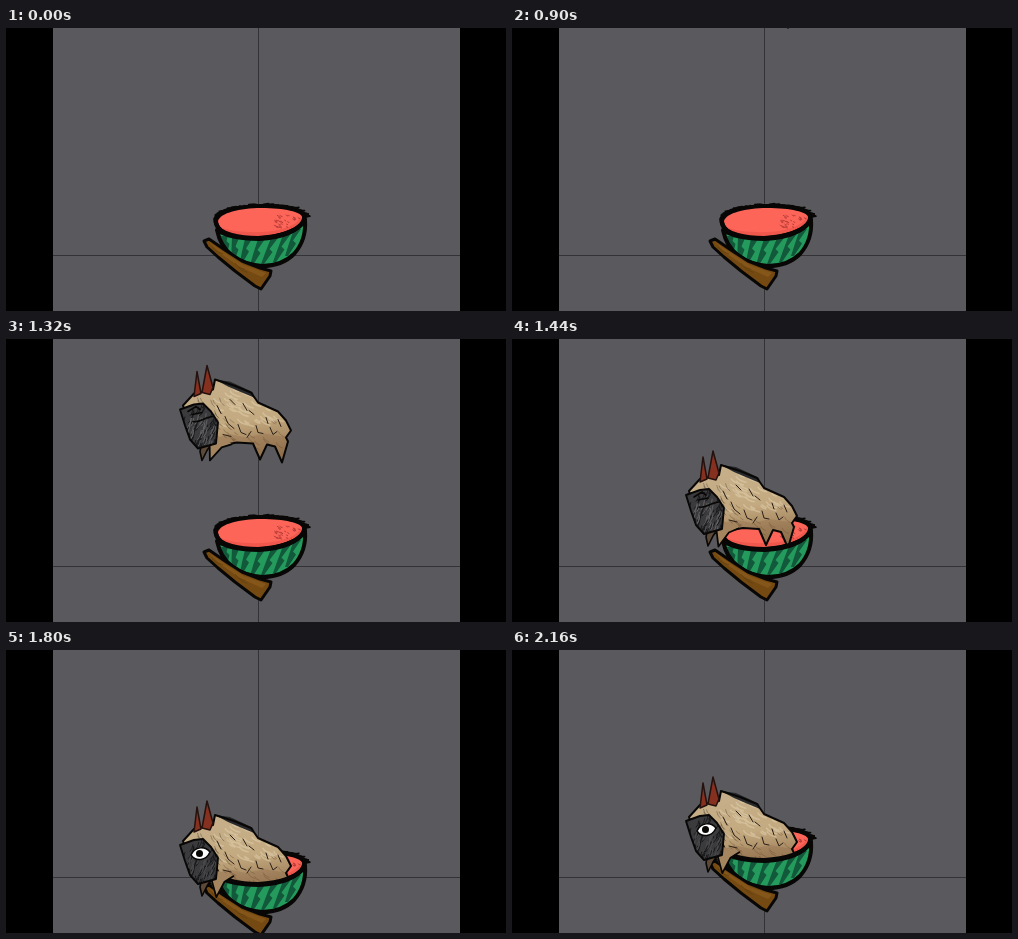
These frames come from a looping animation (500x283 px, 2220 ms). An HTML page with a canvas:

```html
<!DOCTYPE html>
<html lang="en">
<head>
<meta charset="utf-8">
<title>Watermelon bowl</title>
<style>
html, body { margin: 0; width: 100%; height: 100%; overflow: hidden; background: #000; }
canvas { display: block; width: 500px; height: 283px; }
</style>
</head>
<body>
<canvas id="stage" width="500" height="283"></canvas>
<script>
const ctx = document.getElementById('stage').getContext('2d');
const LOOP = 2220, STEP = 60, FALL = 900, LAND = 1440, EYE_OPEN = 1800;
const INK = '#080706';

// Bowl depth and extra sinking of the animal, one entry per step after landing
const DIP = [0, 12, 20, 24, 25, 25, 24, 22, 19, 15, 10, 4, 0];
const SINK = [0, 7, 12, 15, 15];

const P = d => new Path2D(d);
const BACK = 'M177 152L188 140L207 136L209 126L228 132L245 139L252 149L272 158L280 167L285 177L280 184L282 188';
const shape = {
  rim: P('M209 191C211 183 230 178 255 178C280 177 297 181 299 188C300 198 282 210 252 210C228 210 209 204 209 191Z'),
  flesh: P('M212 193C214 185 234 180 255 180C279 180 295 184 296 189C296 197 280 206 254 208C234 209 213 205 212 193Z'),
  pulpShade: P('M214 199C229 205 258 206 276 201C287 198 294 193 295 187C299 196 284 207 254 208C234 209 218 206 214 199Z'),
  wall: P('M211 202C222 210 238 211 253 211C274 210 291 205 299 192C300 205 296 217 288 226C279 235 267 238 256 238C234 236 216 226 211 202Z'),
  rimLine: P('M210 195C212 207 236 210 252 210C274 209 293 203 299 192'),
  spoon: P('M198 213L203 211L219 222L236 233L254 240L265 243L264 248L255 261L249 258L229 243L212 229L201 219Z'),
  spoonLight: P('M203 214L222 227L238 237L260 245L256 249L234 239L214 225Z'),
  standing: P(BACK + 'L276 209L269 193L261 191L254 206L247 190L231 189L220 191L207 195L190 190Z'),
  seated: P(BACK + 'L278 195L264 207L230 207L207 195L190 190Z'),
  belly: P('M208 186L222 180L240 184L258 180L282 184L278 209L230 209L212 194Z'),
  backLine: P('M209 126L224 128L237 134L247 139L248 144L236 139L222 133Z'),
  leg: P('M205 180L227 187L218 193L209 208L205 194Z'),
  legLine: P('M205 190L209 208L218 193L227 188'),
  farLeg: P('M196 188L205 191L201 197L196 207L194 198Z'),
  face: P('M174 156L188 151L197 150L205 158L212 169L210 190L192 195L184 186L179 172Z'),
  horns: [P('M188 143L191 118L195 140Z'), P('M196 139L201 112L207 134L204 141Z')],
  eye: P('M185 166C189 157 199 157 204 163C200 172 190 173 185 166Z'),
  lid: P('M187 168C193 170 200 163 207 163M182 158L190 153L194 156M186 161L196 159')
};

// Top and bottom points of the rind stripes
const stripes = [[218, 208, 221, 222], [229, 210, 228, 231], [242, 211, 236, 234],
  [255, 211, 246, 237], [268, 210, 257, 236], [280, 207, 269, 234], [291, 201, 281, 228]];

function rng(seed) {
  return () => (seed = (seed * 16807) % 2147483647) / 2147483647;
}

// Seeded pencil strokes inside a box
function scribble(seed, count, x, y, w, h, dx, dy) {
  const r = rng(seed), path = new Path2D();
  for (let i = 0; i < count; i++) {
    const px = x + r() * w, py = y + r() * h, k = 0.5 + r();
    path.moveTo(px, py);
    path.quadraticCurveTo(px + dx * k * 0.2, py + dy * k * 0.7, px + dx * k, py + dy * k);
  }
  return path;
}

// Loose brush ends along the back of the rim
function roughRim() {
  const r = rng(29), path = new Path2D();
  for (let a = Math.PI; a < Math.PI * 2; a += 0.11) {
    const x = 254 + 45 * Math.cos(a), y = 190 + 13 * Math.sin(a) - r() * 1.5;
    path.moveTo(x, y);
    path.lineTo(x + 5, y - 1 + r() * 2);
  }
  return path;
}

const marks = {
  rim: roughRim(),
  faceDark: scribble(71, 55, 174, 147, 38, 44, -4, 9),
  faceLight: scribble(33, 30, 184, 160, 26, 32, -3, 8),
  furLight: scribble(18, 45, 208, 132, 66, 36, 7, 4),
  furDark: scribble(57, 34, 207, 165, 74, 30, 5, 4),
  chin: scribble(91, 34, 185, 142, 32, 32, 3, 5),
  tufts: P('M219 163L222 170L228 175M232 171L235 179L240 181M243 157L248 161M250 172L252 179L257 180M260 164L262 170M264 174L267 181L271 178M272 166L275 173M217 181L225 183M224 146L229 151M237 150L241 157M211 152L215 160M241 184L245 178'),
  pulp: scribble(44, 34, 268, 187, 24, 13, 1.6, 0.8),
  grain: scribble(62, 12, 206, 214, 50, 32, 8, 5)
};

function fill(path, color) {
  ctx.fillStyle = color;
  ctx.fill(path);
}

function stroke(path, color, width) {
  ctx.strokeStyle = color;
  ctx.lineWidth = width;
  ctx.stroke(path);
}

function inside(path, draw) {
  ctx.save();
  ctx.clip(path);
  draw();
  ctx.restore();
}

function shifted(dy, draw) {
  ctx.save();
  ctx.translate(0, dy);
  draw();
  ctx.restore();
}

function background() {
  ctx.fillStyle = '#000';
  ctx.fillRect(0, 0, 500, 283);
  ctx.fillStyle = '#5a595e';
  ctx.fillRect(47, 0, 407, 283);
  ctx.fillStyle = '#333236';
  ctx.fillRect(252, 0, 1, 283);
  ctx.fillRect(47, 227, 407, 1);
}

function bowlBack() {
  fill(shape.rim, INK);
  stroke(shape.rim, INK, 3.6);
  stroke(marks.rim, INK, 1.8);
  fill(shape.flesh, '#fd6559');
  inside(shape.flesh, () => {
    fill(shape.pulpShade, '#f0584d');
    stroke(marks.pulp, '#b53c36', 1);
  });
}

function bowlFront() {
  fill(shape.wall, '#249a5c');
  inside(shape.wall, () => {
    ctx.fillStyle = '#12583a';
    for (const [x, y, u, v] of stripes) {
      const mx = (x + u) / 2, my = (y + v) / 2;
      ctx.beginPath();
      ctx.moveTo(x - 3, y);
      ctx.lineTo(x + 4, y);
      ctx.lineTo(mx + 1, my - 2);
      ctx.lineTo(mx + 4, my + 1);
      ctx.lineTo(u + 1, v);
      ctx.lineTo(u - 2, v);
      ctx.lineTo(mx - 3, my + 1);
      ctx.fill();
    }
  });
  stroke(shape.wall, INK, 4);
  stroke(shape.rimLine, INK, 4.2);
}

function spoon() {
  fill(shape.spoon, '#754a12');
  inside(shape.spoon, () => {
    fill(shape.spoonLight, '#85561a');
    stroke(marks.grain, '#62400f', 0.8);
  });
  stroke(shape.spoon, INK, 3);
}

function body(outline) {
  const coat = ctx.createLinearGradient(222, 135, 232, 208);
  coat.addColorStop(0, '#c5ae88');
  coat.addColorStop(0.45, '#c4aa80');
  coat.addColorStop(1, '#91704c');
  fill(outline, coat);
  inside(outline, () => {
    fill(shape.belly, 'rgba(139,105,70,.3)');
    stroke(marks.furLight, 'rgba(228,212,178,.5)', 1.5);
    stroke(marks.furDark, 'rgba(105,77,48,.4)', 1);
    stroke(marks.chin, 'rgba(70,60,50,.45)', 0.9);
    stroke(marks.tufts, '#2a2018', 1);
  });
  fill(shape.backLine, '#28292c');
  stroke(outline, INK, 2);
}

function frontLeg(swing) {
  ctx.save();
  ctx.translate(212, 182);
  ctx.rotate(swing);
  ctx.translate(-212, -182);
  fill(shape.leg, '#a5855f');
  stroke(shape.legLine, INK, 1.8);
  ctx.restore();
}

function head(open) {
  for (const horn of shape.horns) {
    fill(horn, '#86301f');
    stroke(horn, '#25110d', 1.5);
  }
  fill(shape.face, '#3b3b3d');
  inside(shape.face, () => {
    stroke(marks.faceDark, '#17181a', 1);
    stroke(marks.faceLight, open ? '#4c4c4e' : '#666668', 0.9);
  });
  stroke(shape.face, INK, 1.9);
  if (!open) {
    stroke(shape.lid, INK, 1.6);
    return;
  }
  fill(shape.eye, '#fff');
  stroke(shape.eye, INK, 1.5);
  ctx.fillStyle = INK;
  ctx.beginPath();
  ctx.arc(193.5, 164.5, 3.5, 0, Math.PI * 2);
  ctx.fill();
}

function frontParts(swing, open) {
  fill(shape.farLeg, '#5c4938');
  stroke(shape.farLeg, INK, 1.6);
  frontLeg(swing);
  head(open);
}

function fallOffset(t) {
  const n = (t - FALL) / STEP, last = (LAND - FALL) / STEP;
  return 2.12 * (n ** 2.09 - last ** 2.09);
}

function draw(time) {
  const t = Math.floor((time % LOOP) / STEP) * STEP;
  const k = (t - LAND) / STEP;
  const dip = k > 0 ? DIP[k] : 0;
  const sheepY = k < 0 ? fallOffset(Math.max(t, FALL)) : dip + SINK[Math.min(k, 4)];
  const swing = Math.max(-0.05, Math.min(0.3, 0.1 - k * 0.05));
  const visible = t >= FALL;
  const sheep = () => body(k > 2 ? shape.seated : shape.standing);

  background();
  ctx.save();
  ctx.beginPath();
  ctx.rect(47, 0, 407, 283);
  ctx.clip();
  ctx.lineJoin = ctx.lineCap = 'round';
  shifted(dip, bowlBack);
  if (visible && k >= 0) shifted(sheepY, sheep);
  shifted(dip, () => { bowlFront(); spoon(); });
  if (visible && k < 0) shifted(sheepY, sheep);
  if (visible) shifted(sheepY, () => frontParts(swing, t >= EYE_OPEN));
  ctx.restore();
}

const start = performance.now();
function tick() {
  draw(performance.now() - start);
  requestAnimationFrame(tick);
}
tick();
</script>
</body>
</html>
```
